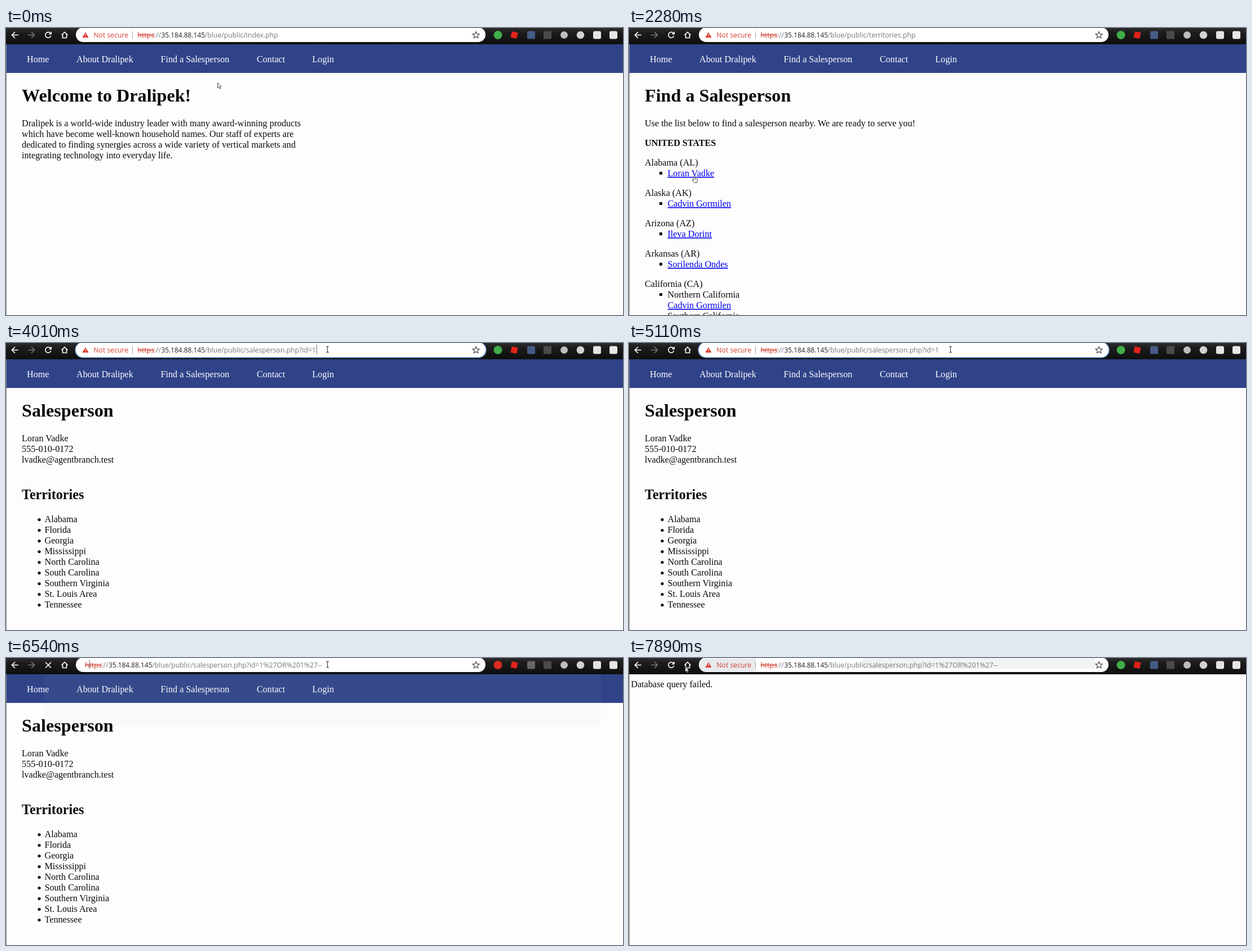
These frames come from a looping animation (1095 by 511 pixels, 8 s). An HTML page:

```html
<!DOCTYPE html>
<html lang="en">
<head>
<meta charset="utf-8">
<title>Browser session</title>
<style>
  html, body { margin: 0; width: 100%; height: 100%; overflow: hidden; background: #fdfdfd; }
  svg { display: block; width: 1095px; height: 511px; }
  .page text { font: 16.15px "Liberation Serif", "Times New Roman", serif; fill: #0a0a0a; }
  .page .h1 { font-size: 32.2px; font-weight: bold; }
  .page .h2 { font-size: 24.15px; font-weight: bold; }
  .page .b { font-weight: bold; }
  .page .link { fill: #0000ee; text-decoration: underline; }
  .page .nav { fill: #fff; }
  .ui text { font: 12.25px "Open Sans", "Noto Sans", sans-serif; fill: #74797e; }
  .ui .host { fill: #202124; }
  .ui #host { font-size: 11.9px; }
  .ui .bad { fill: #d23f31; }
  .ui .strike { text-decoration: line-through; }
  .ui .hit { font-size: 12.55px; font-weight: 700; fill: #1a73e8; }
  .ui .note { fill: #5f6368; }
  .ui .picked text { fill: #fff; }
  .line { fill: none; stroke: #fff; stroke-width: 1.7; }
</style>
</head>
<body>
<svg viewBox="0 0 1095 511" xmlns="http://www.w3.org/2000/svg">
  <defs>
    <linearGradient id="bar" x2="0" y2="1">
      <stop offset="0" stop-color="#2c2c2c"/><stop offset=".3" stop-color="#1c1c1c"/><stop offset="1" stop-color="#0e0e0e"/>
    </linearGradient>
    <filter id="soft" x="-5%" y="-20%" width="110%" height="150%"><feGaussianBlur stdDeviation="2.5"/></filter>
    <g id="globe">
      <circle r="6" fill="#5f6368"/>
      <path d="M-4.5-1 -1 1 -1.5 4.5M0-5 1-2 -1-1M5-2 2 0 3 3" fill="none" stroke="#fff" stroke-width="1.5"/>
    </g>
  </defs>
  <rect width="1095" height="511" fill="#fdfdfd"/>
  <g class="page">
    <g id="site"></g>
    <g id="home"></g>
    <g id="list"></g>
    <g id="person"></g>
    <g id="failed"></g>
  </g>
  <path d="M.5 29V511" stroke="#8a8a8a"/>
  <rect id="residue" x="68" y="29" width="988" height="91" fill="#9fb8ac" opacity=".05"/>
  <rect width="1095" height="29" fill="url(#bar)"/>

  <path class="line" d="M22 12.5H11M16 7 10.5 12.5 16 18"/>
  <path class="line" d="M39 12.5H50M45 7 50.5 12.5 45 18" style="stroke:#777"/>
  <g id="reload">
    <path class="line" d="M78.6 8.9A5 5 0 1 0 79.7 14"/>
    <path d="M81 6V11.5H75.5Z" fill="#fff"/>
  </g>
  <path id="stop" class="line" d="M70 7.5 80 17.5M80 7.5 70 17.5"/>
  <path class="line" d="M98.5 12.5 104 7.3 109.5 12.5M100.5 11.5V17.5H107.5V11.5"/>

  <g class="ui">
    <g id="pill">
      <rect id="ring" x="123.5" y="-.5" width="728" height="26" rx="13" fill="none" stroke="#8ab4f8" stroke-width="2"/>
      <rect id="body" x="124" y="-1" width="727" height="26" rx="13" fill="#fff"/>
      <rect id="band" y="0" height="19.5" fill="#f1f3f4"/>
      <path id="chip" d="M225 1V24H137A11.5 11.5 0 0 1 137 1Z" fill="#e8eaed"/>
      <g id="warn">
        <path d="M141 7.5 146.5 17H135.5Z" fill="#d93025"/>
        <path d="M141 10.5V13.5M141 14.6V15.8" stroke="#fff" stroke-width="1.2"/>
        <text class="bad" x="155.3" y="17">Not secure</text>
        <path d="M224.5 6V19" stroke="#9aa0a6"/>
      </g>
      <path d="M834 6.5 835.7 10.4 840 10.8 836.8 13.6 837.8 17.8 834 15.6 830.2 17.8 831.2 13.6 828 10.8 832.3 10.4Z"
        fill="none" stroke="#555" stroke-width="1.3"/>
    </g>
    <g id="drop">
      <rect x="108" y="29" width="759" height="90.5" fill="#000" opacity=".02"/>
      <rect x="117" y="32" width="741" height="76" rx="9" fill="#000" opacity=".2" filter="url(#soft)"/>
      <path d="M119 0H856V91A8 8 0 0 1 848 99H127A8 8 0 0 1 119 91Z" fill="#fbfbfb"/>
      <use href="#globe" x="141" y="12.5"/>
      <use href="#globe" x="141" y="46.5"/>
      <path d="M142.5 82.5 146 86" stroke="#5f6368" stroke-width="1.6"/>
      <circle cx="139.7" cy="80" r="3.6" fill="none" stroke="#5f6368" stroke-width="1.4"/>
      <text class="hit" x="166" y="51">https://35.184.88.145/blue/public/salesperson.php?id=1%27OR 1%27--</text>
      <text class="host" x="166" y="86">https://35.184.88.145/blue/public/salesperson.php?id=1'OR 1'--</text>
      <text class="note" x="531" y="86">- Quorba Search</text>
    </g>
    <g id="url">
      <rect id="mark" x="234" y="2" width="317" height="21" fill="#0078d7"/>
      <text id="scheme" y="17"></text>
      <text id="slashes" y="17">://</text>
      <text id="host" class="host" y="17">35.184.88.145</text>
      <text id="path" y="17"></text>
    </g>
    <rect id="caret" y="3" width="1" height="17" fill="#777"/>
  </g>

  <circle id="guard" cx="873" cy="12.5" r="7.5"/>
  <rect x="896.5" y="7" width="11" height="11" fill="#e2231a" transform="rotate(12 902 12.5)"/>
  <rect id="tool" x="925" y="5.5" width="14" height="14" rx="2"/>
  <rect x="954" y="5.5" width="14" height="14" fill="#4a4a4a"/>
  <circle cx="990.5" cy="12.5" r="6.5" fill="#bdbdbd"/>
  <circle cx="1019.5" cy="12.5" r="6.8" fill="#d2d2d2"/>
  <rect x="1042" y="5.5" width="14" height="14" rx="3" fill="#e4e4e4"/>
  <rect x="1071" y="5.5" width="14" height="14" rx="3" fill="#e8e8e8"/>

  <g id="arrow"><path d="M.5.5V10L2.8 7.9 4.3 11.5 5.8 10.9 4.4 7.3H7Z" fill="#fff" stroke="#333" stroke-width=".9"/></g>
  <g id="hand"><path d="M3 1Q4-.4 5 1V5L9 6.2Q10 6.6 9.6 8L8.6 12.5H3.8L.4 8Q0 6.6 1.4 6.8L3 8Z" fill="#fff" stroke="#222" stroke-width=".8"/></g>
  <g id="beam"><path d="M-2.5-5.5H2.5M-2.5 4.5H2.5M0-5.5V4.5" fill="none" stroke="#333"/></g>
</svg>
<script>
const $ = id => document.getElementById(id);
const text = (x, y, s, cls = '') => `<text x="${x}" y="${y}" class="${cls}">${s}</text>`;
const lines = (x, y, rows) => rows.map((s, i) => text(x, y + 19 * i, s)).join('');
const square = y => `<rect x="54" y="${y - 8}" width="5" height="5" fill="#0a0a0a"/>`;

$('site').innerHTML = '<rect y="29" width="1095" height="51" fill="#304389"/>' +
  [[37, 'Home'], [125, 'About Dralipek'], [274.5, 'Find a Salesperson'], [445, 'Contact'], [543.5, 'Login']]
    .map(([x, s]) => text(x, 61, s, 'nav')).join('');

$('home').innerHTML = text(28, 131, 'Welcome to Dralipek!', 'h1') + lines(28, 175, [
  'Dralipek is a world-wide industry leader with many award-winning products',
  'which have become well-known household names. Our staff of experts are',
  'dedicated to finding synergies across a wide variety of vertical markets and',
  'integrating technology into everyday life.']);

$('list').innerHTML = text(28, 131, 'Find a Salesperson', 'h1') +
  text(28, 175, 'Use the list below to find a salesperson nearby. We are ready to serve you!') +
  text(28, 210, 'UNITED STATES', 'b') +
  [['Alabama (AL)', 'Loran Vadke'], ['Alaska (AK)', 'Cadvin Gormilen'],
   ['Arizona (AZ)', 'Ileva Dorint'], ['Arkansas (AR)', 'Sorilenda Ondes']].map(([state, name], i) => {
    const y = 245 + 54 * i;
    return text(28, y, state) + square(y + 19) + text(68.5, y + 19, name, 'link');
  }).join('') +
  text(28, 461, 'California (CA)') + square(480) + text(68.5, 480, 'Northern California') +
  text(68.5, 499, 'Cadvin Gormilen', 'link') + text(68.5, 518, 'Southern California');

const areas = ['Alabama', 'Florida', 'Georgia', 'Mississippi', 'North Carolina', 'South Carolina',
  'Southern Virginia', 'St. Louis Area', 'Tennessee'];
$('person').innerHTML = text(28, 131, 'Salesperson', 'h1') +
  lines(28, 175, ['Loran Vadke', '555-010-0172', 'lvadke@agentbranch.test']) +
  text(28, 278, 'Territories', 'h2') + lines(68.5, 319, areas) +
  areas.map((_, i) => `<circle cx="59" cy="${314.5 + 19 * i}" r="2.6" fill="#0a0a0a"/>`).join('');

$('failed').innerHTML = text(3.5, 52, 'Database query failed.');

// Each row: start time in ms, then the value held until the next row
const pages = [[0, 'home'], [1210, 'list'], [2800, 'person'], [6670, 'failed']];
const loading = [[0, false], [820, true], [2280, false], [2410, true], [2920, false], [6540, true], [6940, false]];
const blocked = [[0, false], [1340, true], [2130, false], [2550, true], [2920, false], [6540, true], [6940, false]];
const person = 'salesperson.php?id=1';
const urls = [[0, 233.5, 'index.php'], [1090, 233.5, 'territories.php'], [2550, 233.5, person],
  [5680, 166, person + "'OR 1'--"], [6540, 140, person + '%27OR%201%27--'], [6670, 233.5, person + '%27OR%201%27--']];
const carets = [[0, 0], [4010, 551], [4160, 0], [4590, 551], [5110, 0], [5680, 527], [6080, 0], [6540, 147.5], [6670, 0]];
const bands = [[0, 0], [2550, 552], [3610, 0], [6670, 415]];
const cursors = [
  [0, 'arrow', 375, 97], [150, 'arrow', 365, 74], [290, 'arrow', 347, 54], [670, 'hand', 350, 54],
  [1210, 'hand', 321, 65], [1340, 'arrow', 228, 112], [1480, 'arrow', 112, 206], [1740, 'arrow', 110, 238],
  [1860, 'hand', 112, 260], [2010, 'hand', 112, 263], [2800, 'arrow', 220, 190], [2920, 'arrow', 344, 125],
  [3060, 'arrow', 436, 88], [3190, 'arrow', 522, 48], [3340, 'arrow', 546, 27], [3460, 'arrow', 561, 13],
  [3610, 'beam', 570.5, 12], [7370, 'arrow', 415, 46], [7520, 'arrow', 330, 104], [7640, 'arrow', 235, 68],
  [7770, 'arrow', 165, 14], [7890, 'arrow', 99.5, 15]];

const at = (table, t) => table.findLast(row => row[0] <= t).slice(1);
const show = (id, on) => { $(id).style.display = on ? '' : 'none'; };
const within = (t, from, to) => t >= from && t < to;

function draw(t) {
  const [page] = at(pages, t);
  for (const [, id] of pages) show(id, id === page);
  show('site', page !== 'failed');

  const [busy] = at(loading, t);
  show('stop', busy);
  show('reload', !busy);
  const [red] = at(blocked, t);
  $('guard').setAttribute('fill', red ? '#dd2c22' : '#3fae49');
  $('tool').setAttribute('fill', red ? '#666' : '#465b86');

  const typing = within(t, 5680, 6540);
  show('pill', !typing);
  show('drop', typing);
  show('residue', within(t, 6540, 6670));
  show('warn', !within(t, 6540, 6670));
  show('ring', within(t, 4010, 5680));
  show('chip', t >= 7770);
  $('body').setAttribute('fill', within(t, 3610, 4010) ? '#f1f3f4' : '#fff');
  const [left] = at(bands, t);
  show('band', left);
  $('band').setAttribute('x', left);
  $('band').setAttribute('width', Math.max(0, 827 - left));

  const [x, file] = at(urls, t);
  const picked = within(t, 4160, 4590);
  show('mark', picked);
  $('url').setAttribute('class', picked ? 'picked' : '');
  $('scheme').textContent = 'https';
  $('scheme').setAttribute('class', typing ? '' : 'bad strike');
  $('path').textContent = '/blue/public/' + file;
  [['scheme', 0], ['slashes', 29.3], ['host', 42], ['path', 119.3]]
    .forEach(([id, dx]) => $(id).setAttribute('x', x + dx));

  const [caret] = at(carets, t);
  show('caret', caret);
  $('caret').setAttribute('x', caret);

  const [kind, cx, cy] = at(cursors, t);
  for (const id of ['arrow', 'hand', 'beam']) show(id, id === kind);
  $(kind).setAttribute('transform', `translate(${cx} ${cy})`);
}

const start = performance.now();
function tick() {
  draw((performance.now() - start) % 8000);
  requestAnimationFrame(tick);
}
tick();
</script>
</body>
</html>
```
